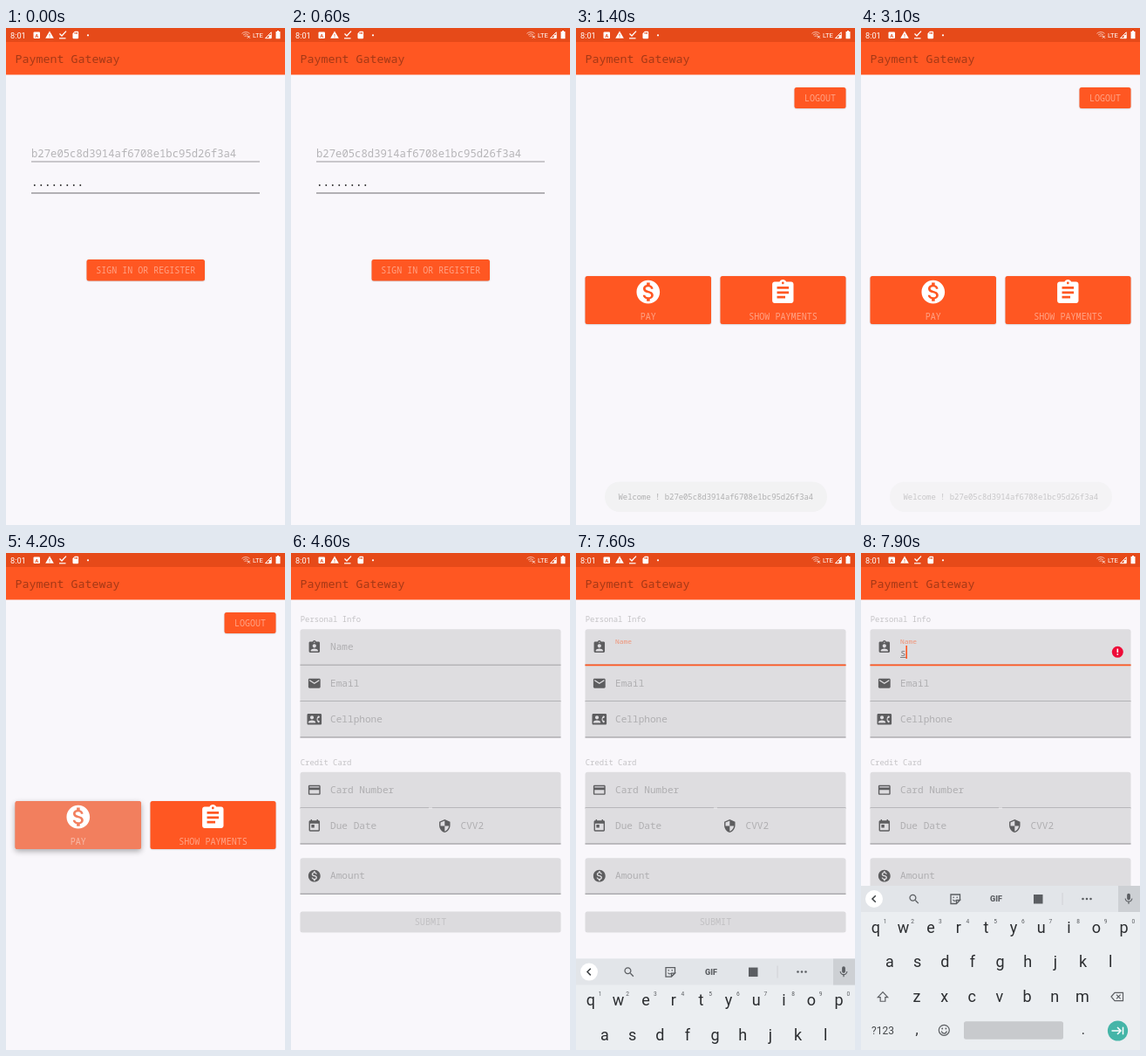
An HTML page with a canvas that plays this animation: 320x569 px, repeating every 8 s.

```html
<!DOCTYPE html>
<html lang="en">
<head>
<meta charset="utf-8">
<title>Payment form</title>
<style>
html, body { margin: 0; width: 100%; height: 100%; overflow: hidden; background: #f9f7fb; }
canvas { display: block; width: 100vw; height: 100vh; }
</style>
</head>
<body>
<canvas id="stage"></canvas>
<script>
const W = 320, H = 569, LOOP = 8000, STEP = 100;
const canvas = document.getElementById('stage');
const ctx = canvas.getContext('2d');
const dpr = window.devicePixelRatio || 1;
canvas.width = W * dpr;
canvas.height = H * dpr;

const MONO = '"Noto Sans Mono", "DejaVu Sans Mono", monospace';
const SANS = 'Roboto, "Noto Sans", sans-serif';
const ORANGE = '#ff5722', PAPER = '#f9f7fb', FIELD = '#dedde0';
const HINT = 'rgba(0,0,0,.21)', PALE = 'rgba(255,255,255,.45)';
const USER = 'b27e05c8d3914af6708e1bc95d26f3a4';

const BOARD = 'M19 3h-4.18C14.4 1.84 13.3 1 12 1c-1.3 0-2.4.84-2.82 2H5c-1.1 0-2 .9-2 2v14c0 1.1.9 2 2 2h14c1.1 0 2-.9 2-2V5c0-1.1-.9-2-2-2zm-7 0c.55 0 1 .45 1 1s-.45 1-1 1-1-.45-1-1 .45-1 1-1z';
const ICONS = {
  list: BOARD + 'm2 14H7v-2h7v2zm3-4H7v-2h10v2zm0-4H7V7h10v2z',
  person: BOARD + 'm0 4c1.66 0 3 1.34 3 3s-1.34 3-3 3-3-1.34-3-3 1.34-3 3-3zm6 12H6v-1.4c0-2 4-3.1 6-3.1s6 1.1 6 3.1V19z',
  coin: 'M12 2C6.48 2 2 6.48 2 12s4.48 10 10 10 10-4.48 10-10S17.52 2 12 2zm1.41 16.09V20h-2.67v-1.93c-1.71-.36-3.16-1.46-3.27-3.4h1.96c.1 1.05.82 1.87 2.65 1.87 1.96 0 2.4-.98 2.4-1.59 0-.83-.44-1.61-2.67-2.14-2.48-.6-4.18-1.62-4.18-3.67 0-1.72 1.39-2.84 3.11-3.21V4h2.67v1.95c1.86.45 2.79 1.86 2.85 3.39H14.3c-.05-1.11-.64-1.87-2.22-1.87-1.5 0-2.4.68-2.4 1.64 0 .84.65 1.39 2.67 1.91s4.18 1.39 4.18 3.91c-.01 1.83-1.38 2.83-3.12 3.16z',
  mail: 'M20 4H4c-1.1 0-2 .9-2 2v12c0 1.1.9 2 2 2h16c1.1 0 2-.9 2-2V6c0-1.1-.9-2-2-2zm0 4l-8 5-8-5V6l8 5 8-5v2z',
  phone: 'M22 3H2C.9 3 0 3.9 0 5v14c0 1.1.9 2 2 2h20c1.1 0 2-.9 2-2V5c0-1.1-.9-2-2-2zM8 6c1.66 0 3 1.34 3 3s-1.34 3-3 3-3-1.34-3-3 1.34-3 3-3zm6 12H2v-1c0-2 4-3.1 6-3.1s6 1.1 6 3.1v1zm3.85-4h1.64L21 16l-1.99 1.99c-1.31-.98-2.28-2.38-2.73-3.99-.18-.64-.28-1.31-.28-2s.1-1.36.28-2c.45-1.62 1.42-3.01 2.73-3.99L21 8l-1.51 2h-1.64c-.22.63-.35 1.3-.35 2s.13 1.37.35 2z',
  card: 'M20 4H4c-1.1 0-2 .9-2 2v12c0 1.1.9 2 2 2h16c1.1 0 2-.9 2-2V6c0-1.1-.9-2-2-2zm0 14H4v-6h16v6zm0-10H4V6h16v2z',
  date: 'M19 3h-1V1h-2v2H8V1H6v2H5c-1.1 0-2 .9-2 2v14c0 1.1.9 2 2 2h14c1.1 0 2-.9 2-2V5c0-1.1-.9-2-2-2zm0 16H5V8h14v11zM7 10h5v5H7z',
  shield: 'M12 1L3 5v6c0 5.55 3.84 10.74 9 12 5.16-1.26 9-6.45 9-12V5l-9-4zm0 11h7c-.53 4.12-3.28 7.79-7 8.94V12H5V6.3l7-3.11V12z',
  search: 'M15.5 14h-.79l-.28-.27C15.41 12.59 16 11.11 16 9.5 16 5.91 13.09 3 9.5 3S3 5.91 3 9.5 5.91 16 9.5 16c1.61 0 3.09-.59 4.23-1.57l.27.28v.79l5 4.99L20.49 19l-4.99-5zm-6 0C7.01 14 5 11.99 5 9.5S7.01 5 9.5 5 14 7.01 14 9.5 11.99 14 9.5 14z',
  mic: 'M12 14c1.66 0 3-1.34 3-3V5c0-1.66-1.34-3-3-3S9 3.34 9 5v6c0 1.66 1.34 3 3 3zm5.3-3c0 3-2.54 5.1-5.3 5.1S6.7 14 6.7 11H5c0 3.41 2.72 6.23 6 6.72V21h2v-3.28c3.28-.48 6-3.3 6-6.72h-1.7z',
  warn: 'M1 21h22L12 2 1 21zm12-3h-2v-2h2v2zm0-4h-2v-4h2v4z',
  sd: 'M18 2h-8L4 8v12c0 1.1.9 2 2 2h12c1.1 0 2-.9 2-2V4c0-1.1-.9-2-2-2zM9 5h2v4H9zm3 0h2v4h-2zm3 0h2v4h-2z',
  shift: 'M12 4L4 12.5h4V19h8v-6.5h4z'
};
for (const k in ICONS) ICONS[k] = new Path2D(ICONS[k]);

function rect(x, y, w, h, fill, r = 0) {
  ctx.fillStyle = fill;
  ctx.beginPath();
  ctx.roundRect(x, y, w, h, r);
  ctx.fill();
}

function circle(x, y, r, fill) {
  ctx.fillStyle = fill;
  ctx.beginPath();
  ctx.arc(x, y, r, 0, Math.PI * 2);
  ctx.fill();
}

function line(color, width, ...pts) {
  ctx.strokeStyle = color;
  ctx.lineWidth = width;
  ctx.beginPath();
  for (let i = 0; i < pts.length; i += 2) ctx.lineTo(pts[i], pts[i + 1]);
  ctx.stroke();
}

function arc(color, width, x, y, r, from, to) {
  ctx.strokeStyle = color;
  ctx.lineWidth = width;
  ctx.beginPath();
  ctx.arc(x, y, r, from, to);
  ctx.stroke();
}

function write(s, x, y, font, fill, align = 'left') {
  ctx.font = font;
  ctx.fillStyle = fill;
  ctx.textAlign = align;
  ctx.fillText(s, x, y);
}

const mono = (s, x, y, size, fill, align) => write(s, x, y, `100 ${size}px ${MONO}`, fill, align);
const sans = (s, x, y, size, fill, align = 'center') => write(s, x, y, `400 ${size}px ${SANS}`, fill, align);

// Icons live on a 24-unit grid and are placed by their centre.
function icon(name, x, y, size, fill, outline = 0) {
  const k = size / 24;
  ctx.save();
  ctx.translate(x - size / 2, y - size / 2);
  ctx.scale(k, k);
  if (outline) {
    ctx.strokeStyle = fill;
    ctx.lineWidth = outline / k;
    ctx.stroke(ICONS[name]);
  } else {
    ctx.fillStyle = fill;
    ctx.fill(ICONS[name], 'evenodd');
  }
  ctx.restore();
}

function button(x, y, w, h, fill, lift = 0) {
  ctx.save();
  ctx.shadowColor = `rgba(0,0,0,${0.2 + lift * 0.12})`;
  ctx.shadowBlur = (1.6 + lift * 5) * dpr;
  ctx.shadowOffsetY = (0.5 + lift * 2) * dpr;
  rect(x, y, w, h, fill, 2.5);
  ctx.restore();
}

function header() {
  rect(0, 16, W, 37.4, ORANGE);
  rect(0, 0, W, 16, '#e64a19');
  mono('Payment Gateway', 10.5, 40, 13.35, 'rgba(0,0,0,.36)');

  sans('8:01', 5, 11.8, 9.2, '#fff', 'left');
  rect(31.5, 4.5, 7.5, 7.5, '#fff', 1);
  write('A', 35.25, 10.7, `700 6px ${SANS}`, '#e64a19', 'center');
  icon('warn', 50, 7.8, 10.5, '#fff');
  line('#fff', 1.3, 61.5, 6.5, 64, 9, 69, 3.6);
  line('#fff', 1.2, 61, 11.8, 68.5, 11.8);
  icon('sd', 79.8, 8, 10, '#fff');
  circle(94, 8.3, 1.1, '#fff');

  for (const r of [2.2, 4.4, 6.6]) {
    arc('rgba(255,255,255,.6)', 1, 275, 11.2, r, -Math.PI * 0.74, -Math.PI * 0.26);
  }
  line('#fff', 0.9, 277, 8.8, 279.8, 11.6);
  line('#fff', 0.9, 279.8, 8.8, 277, 11.6);
  sans('LTE', 283, 11.4, 7.6, '#fff', 'left');
  line('#fff', 1, 297.5, 11.7, 304.2, 11.7, 304.2, 4.8, 297.5, 11.7);
  rect(301.5, 8, 2.7, 3.7, '#fff');
  rect(309.5, 4, 5, 8.3, '#fff', 0.6);
  rect(311, 3, 2, 1.2, '#fff');
}

function login(t) {
  mono(USER, 29, 148, 12.25, 'rgba(0,0,0,.27)');
  rect(29, 152.4, 262, 1, '#99989b');
  for (let i = 0; i < 8; i++) circle(32.8 + i * 7.5, 180, 0.95, '#2c2c2c');
  rect(29, 188.4, 262, 1, '#6c6b6e');
  const lift = t >= 1100 ? 0.6 : t >= 900 ? 0.25 : 0;
  button(92.5, 265, 135.5, 24.5, ORANGE, lift);
  mono('SIGN IN OR REGISTER', 160.2, 281, 10, PALE, 'center');
}

function toast(alpha) {
  ctx.save();
  ctx.globalAlpha = alpha;
  rect(33, 519.5, 255, 34.5, '#f2f2f3', 17);
  mono('Welcome ! ' + USER, 160.3, 540.2, 8.9, 'rgba(0,0,0,.28)', 'center');
  ctx.restore();
}

function menu(t) {
  const press = Math.min(1, Math.max(0, (t - 4000) / 200));
  button(250.5, 68, 59, 24, ORANGE);
  mono('LOGOUT', 280, 83.7, 10, PALE, 'center');
  button(10.5, 284, 144.5, 55, ORANGE, press);
  if (press) rect(10.5, 284, 144.5, 55, `rgba(232,160,145,${press * 0.55})`, 2.5);
  icon('coin', 82.8, 302.2, 32, '#fff');
  mono('PAY', 82.8, 334, 10, PALE, 'center');
  button(165.5, 284, 144, 55, ORANGE);
  icon('list', 237.3, 302.8, 32.5, '#fff');
  mono('SHOW PAYMENTS', 237.5, 334, 10.1, PALE, 'center');

  if (t < 1400) toast((t - 1100) / 300);
  else if (t < 3300) toast(t < 3100 ? 1 : 1 - (t - 3000) / 300);
}

function field(label, glyph, x, y, w, top = 0) {
  rect(x, y, w, 41, FIELD, [top, top, 0, 0]);
  rect(x, y + 40.6, w, 1, '#8d8c90');
  icon(glyph, x + 16.3, y + 20.5, 16.6, '#5d5d5f');
  if (label) mono(label, x + 34.5, y + 24.2, 11.1, HINT);
}

function nameInput(t) {
  const settled = t >= 6300, typed = t >= 7900;
  mono('Name', 45, settled ? 104 : 105, settled ? 7.9 : 8.7, settled ? 'rgba(255,87,34,.55)' : 'rgba(200,90,60,.4)');
  rect(10.5, 127.5, 299, 1.7, ORANGE);
  if (typed) {
    mono('s', 45, 117.5, 11.1, 'rgba(0,0,0,.45)');
    rect(45, 119.2, 6.7, 0.8, '#666');
    circle(294.3, 113.3, 6.5, '#ee0b38');
    rect(293.5, 109.6, 1.6, 4.4, '#fff');
    rect(293.5, 115.2, 1.6, 1.6, '#fff');
  }
  let caret = 1;
  if (t >= 6600 && t < 7100) caret = t < 6700 ? 0.35 : 0;
  if (t >= 7600 && !typed) caret = 0;
  ctx.globalAlpha = caret;
  rect(typed ? 51.4 : 45, 106, 1.6, 15, settled ? ORANGE : '#cc4c2a');
  ctx.globalAlpha = 1;
}

function form(t) {
  const focused = t >= 6200;
  mono('Personal Info', 10.8, 79.2, 8.9, HINT);
  field(focused ? '' : 'Name', 'person', 10.5, 87.2, 299, 3);
  field('Email', 'mail', 10.5, 128.7, 299);
  field('Cellphone', 'phone', 10.5, 169.8, 299);
  if (focused) nameInput(t);

  mono('Credit Card', 10.8, 242.6, 8.9, HINT);
  field('Card Number', 'card', 10.5, 250.8, 299, 3);
  field('Due Date', 'date', 10.5, 292, 149.5);
  field('CVV2', 'shield', 160, 292, 149.5);
  rect(158, 291.5, 4, 1, '#efeef1');
  field('Amount', 'coin', 10.5, 349.2, 299, 3);

  rect(10.5, 410.5, 299, 24, '#dcdbde', 2.5);
  mono('SUBMIT', 160, 426, 10.2, 'rgba(0,0,0,.12)', 'center');
}

function keyRow(keys, x, y) {
  [...keys].forEach((k, i) => sans(k, x + i * 31.65, y, 18, '#2b2d30'));
}

function keyboard(drop) {
  const ink = '#5b5e62';
  ctx.save();
  ctx.translate(0, drop);
  rect(0, 381, W, 188, '#ebeef1');
  rect(0, 381, W, 30, '#e2e5e9');
  rect(295, 381, 25, 30, '#cdd0d4');

  circle(15, 396, 10, '#fff');
  line('#3c4043', 1.5, 16.8, 392.2, 13, 396, 16.8, 399.8);
  icon('search', 61, 396.3, 15, ink);
  line(ink, 1.3, 113.5, 397.5, 113.5, 391, 103, 391, 103, 401.5, 109.5, 401.5, 113.5, 397.5, 109.5, 397.5, 109.5, 401.5);
  circle(106.2, 394.3, 0.8, ink);
  circle(110.2, 394.3, 0.8, ink);
  line(ink, 1.1, 105.4, 397, 107, 398.4, 109, 398);
  write('GIF', 155, 399, `900 9px ${SANS}`, ink, 'center');
  rect(198, 391, 10.5, 10.5, ink);
  rect(230.6, 389, 0.9, 14, '#cdd0d4');
  for (const x of [254.5, 259, 263.5]) circle(x, 396, 1.3, ink);
  icon('mic', 307, 396, 15, ink);

  keyRow('qwertyuiop', 16.8, 434.6);
  [...'1234567890'].forEach((d, i) => sans(d, 27.5 + i * 31.65, 423.6, 6.6, ink));
  keyRow('asdfghjkl', 33, 474.2);
  keyRow('zxcvbnm', 64, 514);

  icon('shift', 25, 508.3, 17, ink, 1.2);
  line(ink, 1.2, 287, 508, 291, 503.3, 300.5, 503.3, 300.5, 512.7, 291, 512.7, 287, 508, 291, 503.3);
  line(ink, 1.2, 293, 505.7, 297.6, 510.3);
  line(ink, 1.2, 297.6, 505.7, 293, 510.3);

  sans('?123', 25, 551, 12, '#44474a');
  sans(',', 64, 551, 16, '#2b2d30');
  arc(ink, 1.2, 95.3, 546.3, 6, 0, Math.PI * 2);
  arc(ink, 1.2, 95.3, 547, 3, 0.15, Math.PI - 0.15);
  circle(93.2, 544.5, 0.9, ink);
  circle(97.4, 544.5, 0.9, ink);
  rect(118, 536.3, 114, 20.5, '#c8cacd', 2.5);
  sans('.', 254.8, 551, 16, '#2b2d30');
  circle(294.5, 547, 11.6, '#45b5a8');
  line('#fff', 1.5, 287.5, 547, 297.5, 547);
  line('#fff', 1.5, 294, 543, 298, 547, 294, 551);
  line('#fff', 1.5, 300.5, 542.7, 300.5, 551.3);
  ctx.restore();
}

function draw(t) {
  ctx.setTransform(dpr, 0, 0, dpr, 0, 0);
  rect(0, 0, W, H, PAPER);
  if (t < 1200) login(t);
  else if (t < 4600) menu(t);
  else form(t);
  header();
  if (t >= 7600) {
    const left = Math.max(0, 1 - (t - 7500) / 300);
    keyboard(188 * left * left);
  }
}

function tick() {
  const t = performance.now() % LOOP;
  draw(Math.floor(t / STEP) * STEP);
  requestAnimationFrame(tick);
}
tick();
</script>
</body>
</html>
```
